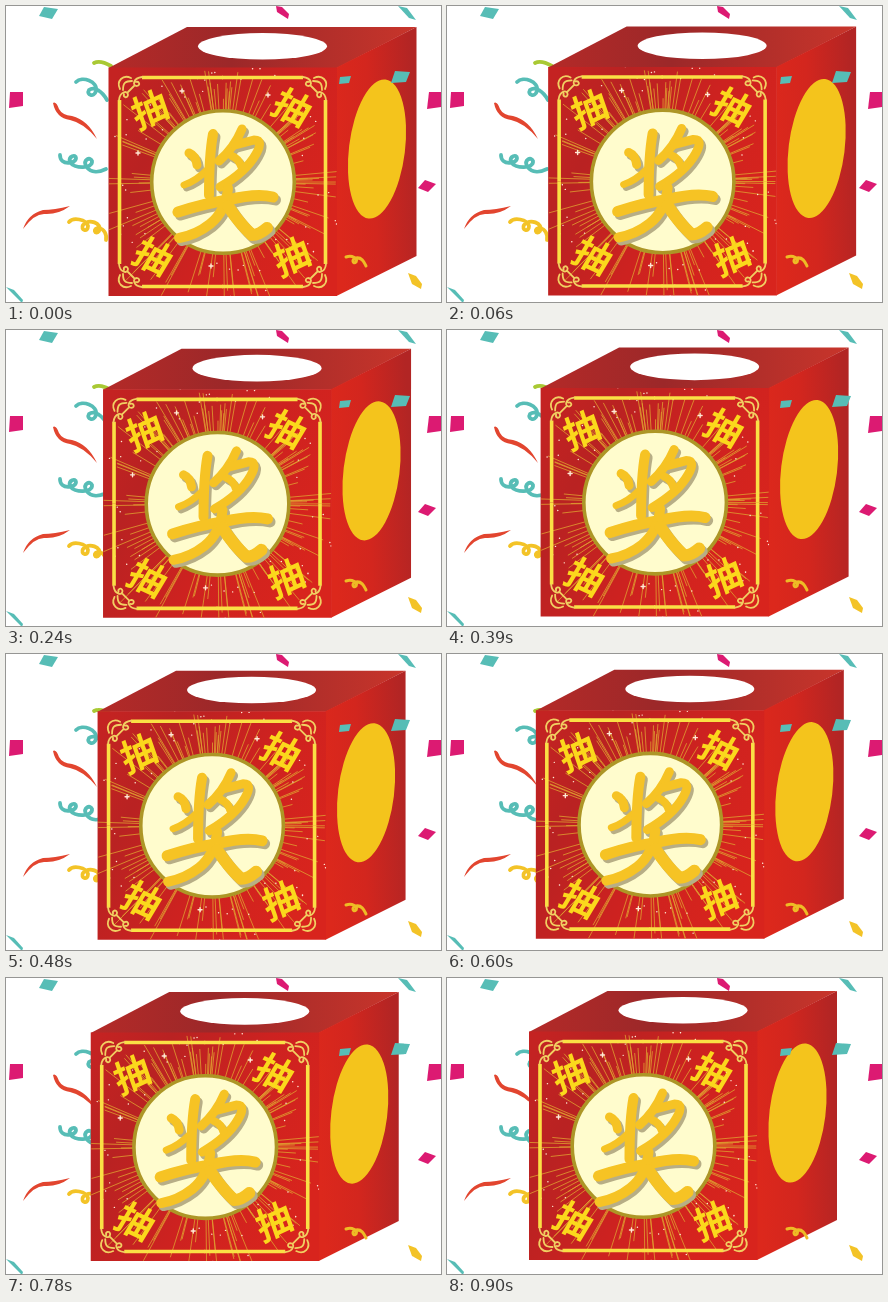
Write an HTML page that moves like this. It is 435 px wide and 296 px high and loops after 1670 ms.

```html
<!DOCTYPE html>
<html lang="zh">
<head>
<meta charset="utf-8">
<style>
html, body { margin: 0; width: 100%; height: 100%; overflow: hidden; background: #fff; }
svg { display: block; width: 435px; height: 296px; }
text { font-family: "Noto Sans CJK SC", "Noto Sans CJK", sans-serif; font-weight: 700; text-anchor: middle; }
.line { fill: none; stroke-linecap: round; stroke-linejoin: round; }
.teal { fill: #57bdb6; }
.pink { fill: #dc1a72; }
.coral { fill: #e2452f; }
</style>
</head>
<body>
<svg viewBox="0 0 435 296">
  <defs>
    <linearGradient id="front" y1=".1" x2="1" y2=".6">
      <stop offset="0" stop-color="#c42322"/>
      <stop offset=".25" stop-color="#b92222"/>
      <stop offset=".6" stop-color="#cd2220"/>
      <stop offset="1" stop-color="#d8241d"/>
    </linearGradient>
    <linearGradient id="side" y1=".6" x2="1" y2=".4">
      <stop offset="0" stop-color="#dc281c"/>
      <stop offset=".45" stop-color="#d3261e"/>
      <stop offset="1" stop-color="#b22524"/>
    </linearGradient>
    <linearGradient id="top">
      <stop offset="0" stop-color="#b42a28"/>
      <stop offset=".4" stop-color="#9c2829"/>
      <stop offset="1" stop-color="#c8352b"/>
    </linearGradient>
    <clipPath id="face"><path d="M103 62H331V290H103z"/></clipPath>
    <g id="corner" class="line">
      <path stroke="#fae045" stroke-width="3.6" stroke-linecap="butt" d="M1.500 106V24M105 1.500H24"/>
      <path stroke="#f1cf62" stroke-width="1.8" d="M1 24C2 15 10 14 10 19C9 23 5 21 6 18M24 1C15 2 14 10 19 10C23 9 21 5 18 6M2 13C-2 5 5 -2 13 2M5 14C5 7 7 5 14 5M10 16L16 10"/>
    </g>
  </defs>

  <!-- streamers behind the box -->
  <g class="line" stroke-width="3.8">
    <path stroke="#a9c934" d="M88 57C92 55 98 56 105 60"/>
    <g stroke="#57bdb6">
      <path d="M70 76C76 70 92 75 90 85C88 92 80 89 83 84C88 80 96 85 101 94"/>
      <path d="M54 149C54 160 70 158 70 152C70 148 62 150 64 156C68 163 87 163 86 155C84 150 77 154 80 160C85 168 94 166 100 163"/>
    </g>
    <path stroke="#f3c327" d="M63 216C67 211 80 213 82 220C82 227 74 224 77 219C82 212 97 217 93 225C89 230 86 222 93 222C98 223 101 228 100 234"/>
  </g>
  <g class="coral">
    <path d="M47 97Q50 95 53 103Q56 109 66 110Q82 114 91 133Q78 117 64 114Q50 112 47 97z"/>
    <path d="M17 223Q22 208 37 204Q48 204 64 200Q52 209 38 208Q28 208 17 223z"/>
  </g>

  <g id="box">
    <path fill="url(#top)" d="M102.500 62L181 21H410.500L331 62z"/>
    <path fill="url(#side)" d="M330.500 61.500L410.500 21V250L330.500 290z"/>
    <path fill="url(#front)" d="M102.500 61.500H331V290H102.500z"/>
    <ellipse cx="256.500" cy="40.300" rx="64.500" ry="13.300" fill="#fff"/>
    <ellipse cx="371" cy="143" rx="28" ry="70" transform="rotate(7 371 143)" fill="#f4c41c"/>

    <g clip-path="url(#face)" class="line">
      <path id="rays" stroke="#e0a030" stroke-width=".8"/>
      <path id="sparks" stroke="#ffe9d6" stroke-width="1.400"/>
    </g>
    <g id="corners"></g>
    <circle cx="217" cy="176" r="71.300" fill="#fffccd" stroke="#ad9626" stroke-width="3.6"/>
    <g id="small" fill="#fbd81c" font-size="37"></g>
    <g class="line" role="img" aria-label="奖">
      <g class="brush" stroke="#b7ae86" transform="translate(2.500 3)"></g>
      <g class="brush" stroke="#f6c324"></g>
    </g>
  </g>

  <!-- confetti in front -->
  <g class="teal">
    <path d="M38 1L52 3L46 13L33 10z"/>
    <path d="M0 281L8 284L17 294L16 297z"/>
    <path d="M392 0L401 2L410 14L403 12z"/>
    <path d="M389 65L404 66L400 76L385 77z"/>
    <path d="M334 71L345 70L343 77L333 78z"/>
  </g>
  <g class="pink">
    <path d="M4 86L17 86L17 100L3 102z"/>
    <path d="M270 0L276 1L283 8L282 13L271 6z"/>
    <path d="M423 86L436 86L435 101L421 103z"/>
    <path d="M412 182L419 174L430 178L422 186z"/>
  </g>
  <path fill="#f3c327" d="M402 267L410 270L416 278L415 283L406 278z"/>
  <path class="line" stroke="#eebc25" stroke-width="3" d="M340 251C346 249 352 252 350 256C347 259 345 253 350 252C356 251 358 256 360 260"/>
</svg>
<script>
const $ = id => document.getElementById(id);
let seed = 7;
const rand = () => (seed = seed * 16807 % 2147483647) / 2147483647;

// light rays and sparkles around the disc, fuller towards the lower left
const polar = (r, a) => `${217 + r * Math.cos(a)} ${176 + r * Math.sin(a)}`;
let rays = "", sparks = "";
for (let i = 0; i < 130; i++) {
  const a = rand() * 2 * Math.PI;
  const reach = 45 + 18 * Math.cos(a - 2.3);
  rays += `M${polar(72, a)}L${polar(82 + reach * rand(), a)}`;
}
for (let i = 0; i < 60; i++) sparks += `M${polar(78 + 45 * rand(), rand() * 2 * Math.PI)}h.1`;
for (const [x, y] of [[132, 147], [176, 85], [262, 89], [205, 260]])
  sparks += `M${x - 2} ${y}h4m-2-2v4`;
$("rays").setAttribute("d", rays);
$("sparks").setAttribute("d", sparks);

$("corners").innerHTML = [[112, 70, 1, 1], [321, 70, -1, 1], [112, 282, 1, -1], [321, 282, -1, -1]]
  .map(([x, y, sx, sy]) => `<use href="#corner" transform="translate(${x} ${y}) scale(${sx} ${sy})"/>`).join("");
$("small").innerHTML = [[144, 104, -25], [286, 102, 25], [147, 251, 25], [286, 251, -25]]
  .map(([x, y, a]) => `<text transform="translate(${x} ${y}) rotate(${a}) skewX(-6)" y="13">抽</text>`).join("");

// brush lettering: stroke width and path
const strokes = [
  [9, "M183 147Q190 150 191 159"],
  [7, "M178 179Q190 175 201 164"],
  [10, "M207 128Q203 150 203 189"],
  [9, "M236 123Q228 142 213 155"],
  [9, "M229 139L248 134Q258 134 250 148Q240 166 214 181"],
  [8, "M226 150Q233 153 235 160"],
  [11, "M172 206Q200 197 222 194Q250 187 267 191"],
  [10, "M222 182Q220 205 204 218Q190 229 173 232"],
  [12, "M222 200Q233 217 246 229Q253 229 261 222"],
].map(([w, d]) => `<path stroke-width="${w}" d="${d}"/>`).join("");
for (const g of document.querySelectorAll(".brush")) g.innerHTML = strokes;

// the box slides up and left, rests, then jumps back
const LOOP = 1670, MOVE = 900, STEP = 30;
let start;
function draw(now) {
  start ??= now;
  const t = Math.floor((now - start) % LOOP / STEP) * STEP;
  const p = Math.min(t / MOVE, 1);
  $("box").setAttribute("transform", `translate(${-20.5 * p} ${-8 * p})`);
  requestAnimationFrame(draw);
}
requestAnimationFrame(draw);
</script>
</body>
</html>
```
